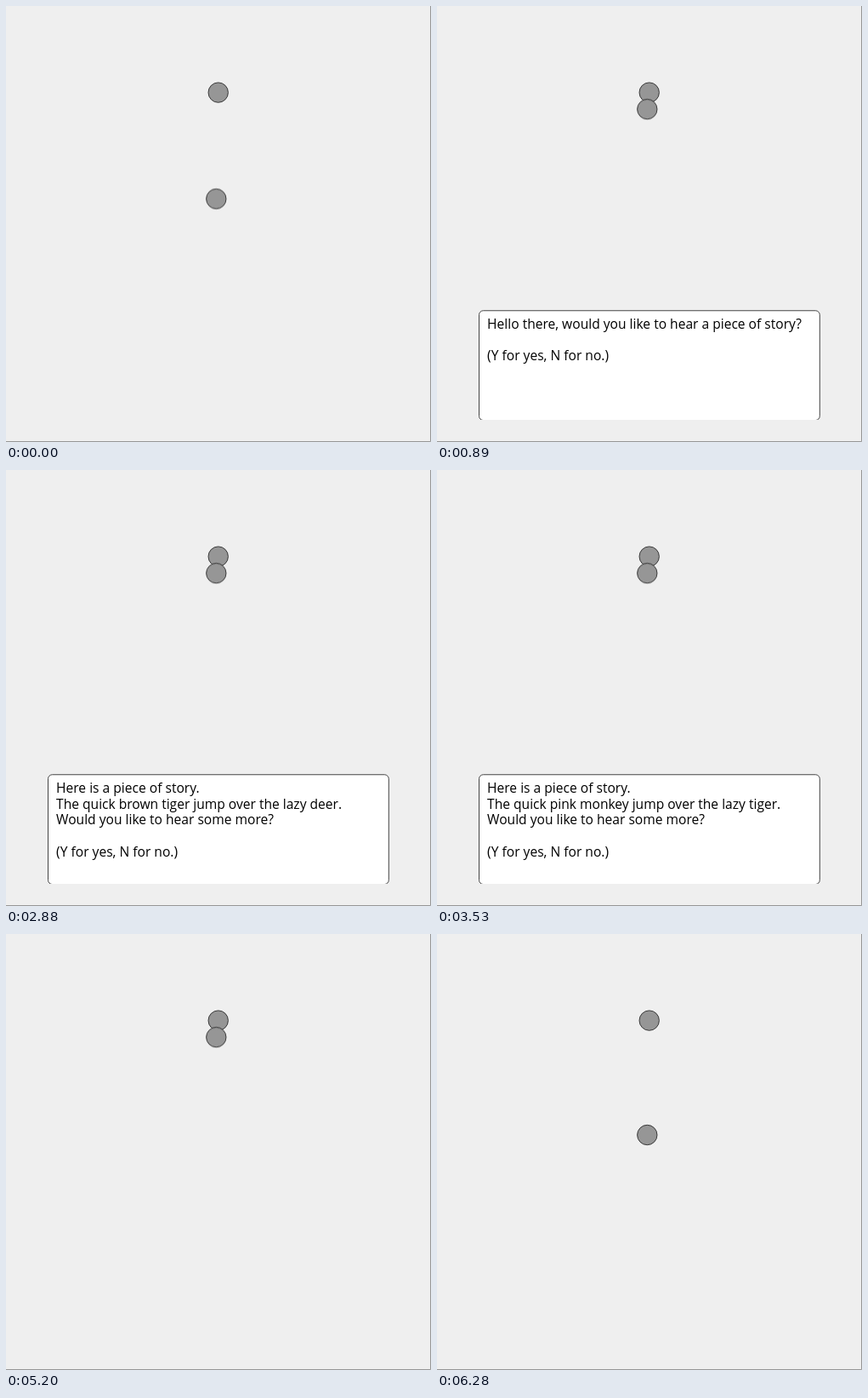
Write an HTML page that moves like this. It is 500 px wide and 512 px high and loops after 7070 ms.

```html
<!DOCTYPE html>
<html lang="en">
<head>
<meta charset="utf-8">
<title>Story time</title>
<style>
  html, body { margin: 0; width: 100%; height: 100%; overflow: hidden; background: #efefef; }
  svg { display: block; }
  text { font: 15.58px "Open Sans", "Noto Sans", sans-serif; fill: #000; }
  .ball { fill: #969696; stroke: #1a1a1a; stroke-width: .8; }
  .walker, .panel, .greeting, .story, .strip { animation: 7070ms step-end infinite; }
  .walker { animation-name: walk; }
  .panel { animation-name: panel; }
  .greeting { animation-name: greeting; }
  .story { animation-name: story; }
  .strip { animation-name: strip; }

  @keyframes walk {
    0% { transform: translateY(226.5px); }
    2.404% { transform: translateY(226.5px); animation-timing-function: steps(13, start); }
    11.173% { transform: translateY(123.15px); }
    11.1731% { transform: translateY(121.2px); }
    79.349% { transform: translateY(121.2px); animation-timing-function: steps(14, start); }
    88.826% { transform: translateY(232.5px); }
    88.8261%, 100% { transform: translateY(236px); }
  }
  @keyframes panel {
    0%, 73.55%, 100% { visibility: hidden; }
    12.588% { visibility: visible; }
  }
  @keyframes greeting {
    0%, 28.995%, 100% { visibility: hidden; }
    12.588% { visibility: visible; }
  }
  @keyframes story {
    0%, 73.55%, 100% { visibility: hidden; }
    28.995% { visibility: visible; }
  }
  /* one 20px row per sentence */
  @keyframes strip {
    0% { transform: translateY(0); }
    34.794% { transform: translateY(-20px); }
    38.048% { transform: translateY(-40px); }
    40.735% { transform: translateY(-60px); }
    43.988% { transform: translateY(-80px); }
    46.676% { transform: translateY(-100px); }
    49.929% { transform: translateY(-120px); }
    53.182% { transform: translateY(-140px); }
    60.396% { transform: translateY(-160px); }
    63.083% { transform: translateY(-180px); }
    66.336%, 100% { transform: translateY(-200px); }
  }
</style>
</head>
<body>
<svg width="500" height="512" viewBox="0 0 500 512">
  <rect width="500" height="512" fill="#efefef"/>
  <path d="M499.5 0V511.5H0" fill="none" stroke="#969696"/>

  <circle class="ball" cx="249.7" cy="101.6" r="11.7"/>
  <g class="walker"><circle class="ball" cx="247.3" cy="0" r="11.7"/></g>

  <g class="panel">
    <!-- the lower outline is cut off -->
    <svg x="49" y="357" width="402" height="129">
      <rect x=".5" y=".75" width="400.8" height="128.75" rx="5" fill="#fff" stroke="#444"/>
    </svg>
  </g>

  <g class="greeting">
    <text x="59.1" y="378.8">Hello there, would you like to hear a piece of story?</text>
    <text x="59.1" y="416.2">(Y for yes, N for no.)</text>
  </g>

  <g class="story">
    <text x="59.1" y="378.8">Here is a piece of story.</text>
    <svg x="50" y="382" width="399" height="20">
      <g class="strip">
        <text x="9.1" y="15.6">The quick grey tiger jump over the lazy deer.</text>
        <text x="9.1" y="35.6">The quick pink dog jump over the lazy tiger.</text>
        <text x="9.1" y="55.6">The quick grey monkey jump over the lazy monkey.</text>
        <text x="9.1" y="75.6">The quick brown tiger jump over the lazy deer.</text>
        <text x="9.1" y="95.6">The quick grey tiger run over the lazy dog.</text>
        <text x="9.1" y="115.6">The quick pink deer run over the lazy monkey.</text>
        <text x="9.1" y="135.6">The quick pink monkey jump over the lazy tiger.</text>
        <text x="9.1" y="155.6">The quick pink dog jump over the lazy dog.</text>
        <text x="9.1" y="175.6">The quick pink deer run over the lazy deer.</text>
        <text x="9.1" y="195.6">The quick brown dog run over the lazy tiger.</text>
        <text x="9.1" y="215.6">The quick pink tiger run over the lazy dog.</text>
      </g>
    </svg>
    <text x="59.1" y="416.2">Would you like to hear some more?</text>
    <text x="59.1" y="453.6">(Y for yes, N for no.)</text>
  </g>
</svg>
</body>
</html>
```
